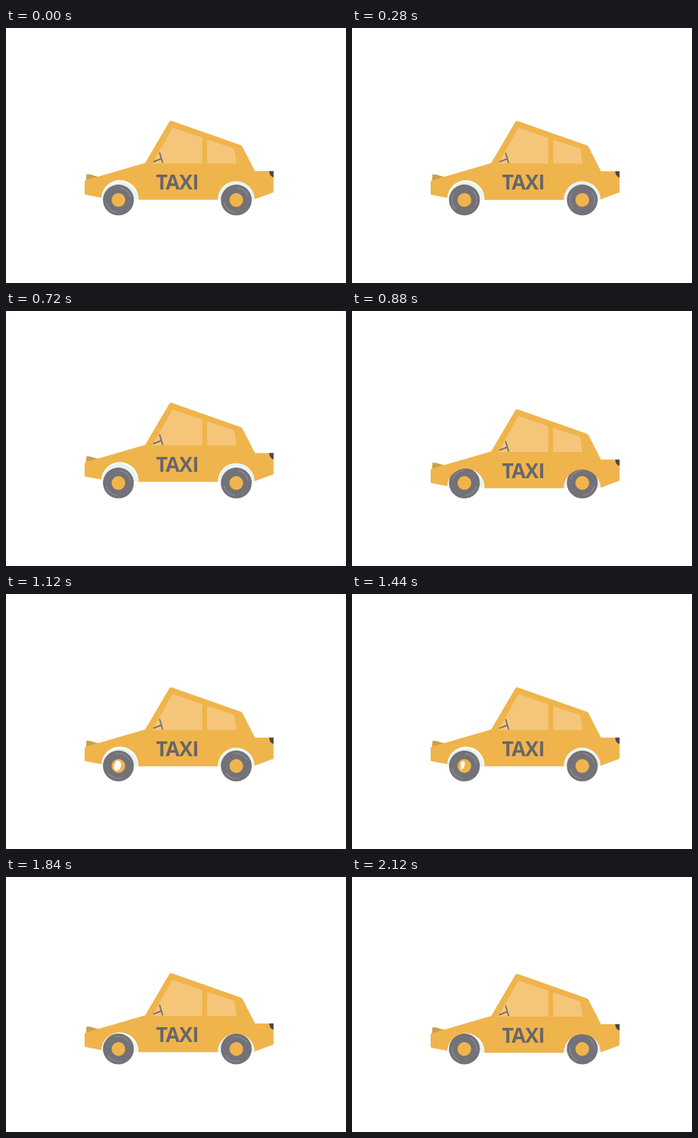
These frames come from a looping animation (480 px wide and 360 px high, 2.16 s). An HTML page:

```html
<!DOCTYPE html>
<html lang="en">
<head>
<meta charset="utf-8">
<title>Taxi</title>
<style>
  html, body { margin: 0; width: 100%; height: 100%; overflow: hidden; background: #fff; }
  svg { display: block; width: 480px; height: 360px; }
  text { font: 700 28.5px "Open Sans", "Noto Sans", sans-serif; letter-spacing: -.7px; fill: #67666a; }
</style>
</head>
<body>
<svg viewBox="0 0 480 360">
  <defs>
    <g id="tyre">
      <circle r="21.8" fill="#737278"/>
      <g fill="none" stroke="#8c8a8d" stroke-width="1.3" stroke-linecap="round">
        <path d="M2 -17.5A17.6 17.6 0 0 1 17 -4"/>
        <path d="M-2 17.5A17.6 17.6 0 0 1 -17 4"/>
      </g>
      <circle r="9.7" fill="#f0b44c"/>
    </g>
  </defs>
  <g class="bounce" fill="#e8f4f2">
    <path d="M135 243V239A26 26 0 0 1 186.5 243Z"/>
    <path d="M299 243A26 26 0 0 1 351 243Z"/>
  </g>
  <use href="#tyre" class="wheel" data-x="158.7"/>
  <use href="#tyre" class="wheel" data-x="325.1"/>
  <path id="glint" fill="#fff"/>
  <g class="bounce">
    <path d="M113.5 207.3H118L132 211.3L113 217Z" fill="#c9a04c"/>
    <path fill="#f0b44c" d="M111 217.5Q111 216 113 215.5L196.5 191.2L230.5 133.2Q232 131 235 132.2
      L331 166Q333 166.6 334 168.6L351.5 202.7H377.7V232.6L351 242.4A26 26 0 0 0 299 243.3H187
      A26 26 0 0 0 134.5 240.2L112 235.9Q111 235.7 111 234.5Z"/>
    <path fill="#f5c67a" d="M235 141.2L277 155.7V192H206.5ZM284 158.2L322 170.7L325.5 192H284Z"/>
    <path fill="none" stroke="#77716f" stroke-width="2" stroke-linecap="round" d="M217 177.2L221 190.7M208.5 189.4L219 185.2"/>
    <path fill="#4d474a" d="M371.5 202.7H377.7V211.8Q372 210 371.5 202.7Z"/>
    <text x="211.8" y="228.7">TAXI</text>
  </g>
</svg>
<script>
  const LOOP = 2160, STEP = 40, TURNS = 3;
  // time in ms, vertical shift of the body
  const bounce = [
    [0, -0.7], [280, -0.5], [600, -8], [880, 7], [1120, 0], [1240, -1.8],
    [1440, 0], [1680, 0.4], [1840, 4], [1980, 5.5], [2160, 5]
  ];
  const bodyParts = document.querySelectorAll(".bounce");
  const wheels = document.querySelectorAll(".wheel");
  const glint = document.getElementById("glint");

  function shiftAt(t) {
    const i = bounce.findIndex(k => k[0] > t);
    const [t0, y0] = bounce[i - 1], [t1, y1] = bounce[i];
    const ease = (1 - Math.cos(Math.PI * (t - t0) / (t1 - t0))) / 2;
    return y0 + (y1 - y0) * ease;
  }

  function glintAt(t) {
    if (t < 1000 || t >= 1640) return "";
    return t < 1280
      ? "M153 240L156 235L161 236L163 241L161 247L156 250L152 246Z"
      : "M153.5 237L158 235.5L159.5 240L158 245L153.5 249Z";
  }

  function draw(now) {
    const t = Math.floor((now % LOOP) / STEP) * STEP;
    const angle = -360 * TURNS * t / LOOP;
    bodyParts.forEach(p => p.setAttribute("transform", `translate(0 ${shiftAt(t)})`));
    wheels.forEach(w => w.setAttribute("transform",
      `translate(${w.dataset.x} 242.8) rotate(${angle})`));
    glint.setAttribute("d", glintAt(t));
  }

  const start = performance.now();
  function tick() {
    draw(performance.now() - start);
    requestAnimationFrame(tick);
  }
  tick();
</script>
</body>
</html>
```
